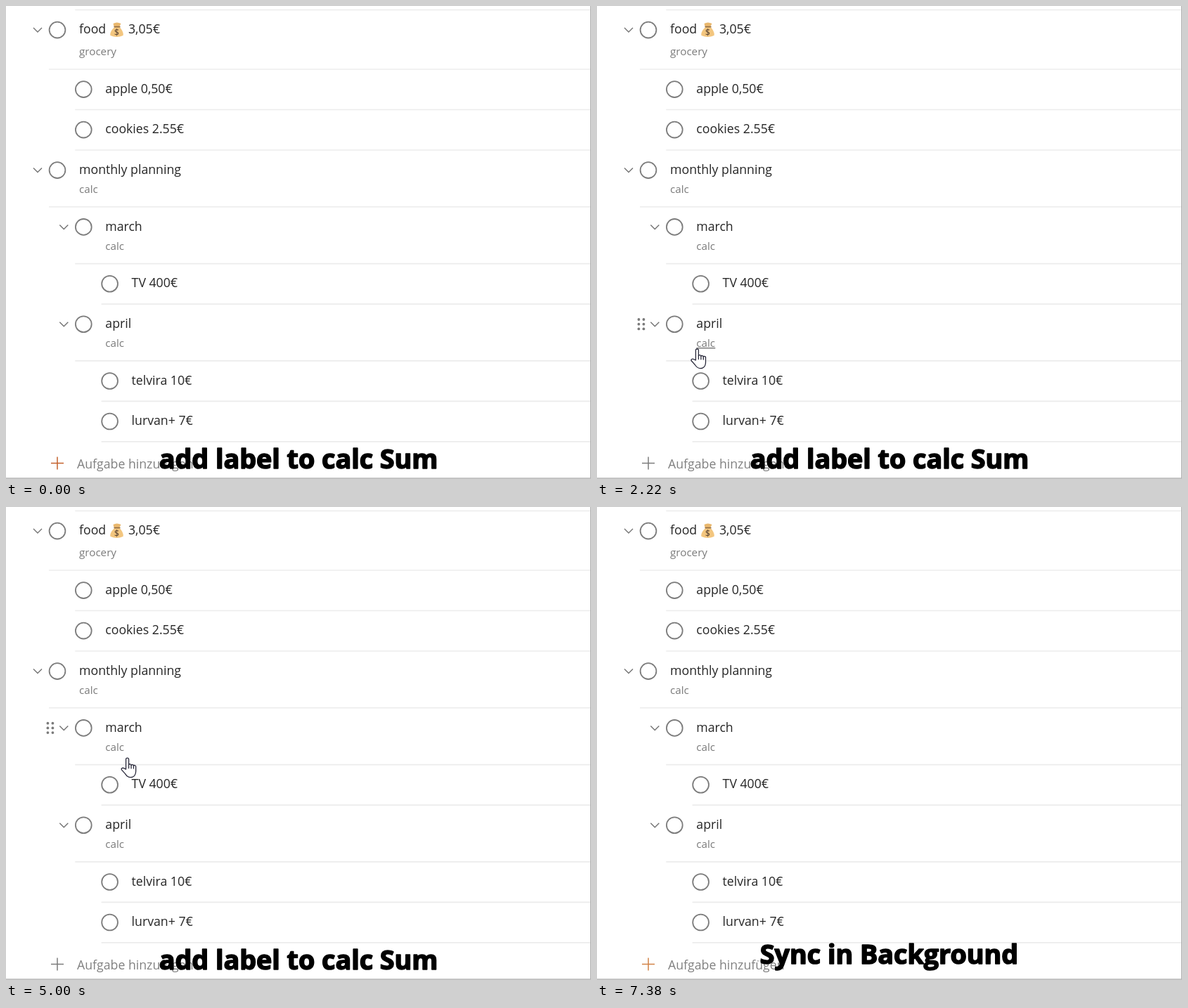
Recreate the animation shown at these times as an HTML page. Size 832 by 673 pixels, loop 8000 ms.

```html
<!DOCTYPE html>
<html lang="en">
<head>
<meta charset="utf-8">
<title>Task list</title>
<style>
  html, body { margin: 0; width: 100%; height: 100%; overflow: hidden; background: #fff; }
  svg { display: block; width: 832px; height: 673px; font-family: "Open Sans", "Noto Sans", sans-serif; }
  .name { font-size: 17.7px; fill: #262626; }
  .label { font-size: 15.2px; fill: #7a7a7a; }
  .rule { stroke: #ececec; stroke-width: 1.6; }
  .ring { fill: none; stroke: #7c7c7c; stroke-width: 1.8; }
  .thin { fill: none; stroke: #747474; stroke-width: 1.4; }
  .caption { font-size: 37.7px; font-weight: 700; text-anchor: middle; stroke: #000; stroke-width: 1.6; stroke-linejoin: round; }
  .hand { fill: #fff; stroke: #29293a; stroke-width: 1.3; stroke-linejoin: round; stroke-linecap: round; }
</style>
</head>
<body>
<svg id="stage" viewBox="0 0 832 673"></svg>
<script>
const LOOP = 8000, INDENT = 37.3, FIRST_TOP = 5.5;
const PLAIN_HEIGHT = 57.5, LABEL_HEIGHT = 80.8, EMOJI_EXTRA = 3.7;
const ORANGE = '#c4622d', GRAY = '#7c7c7c';
const stage = document.getElementById('stage');

function add(tag, attrs = {}, text = '', parent = stage) {
  const node = document.createElementNS('http://www.w3.org/2000/svg', tag);
  for (const key in attrs) node.setAttribute(key, attrs[key]);
  node.textContent = text;
  parent.append(node);
  return node;
}

const show = (node, on) => node.setAttribute('visibility', on ? 'visible' : 'hidden');
const rule = (x, y) => add('line', { class: 'rule', x1: x, x2: 831, y1: y, y2: y });

const tasks = [
  { depth: 0, name: 'food', label: 'grocery', total: '3,05€' },
  { depth: 1, name: 'apple 0,50€' },
  { depth: 1, name: 'cookies 2.55€' },
  { depth: 0, name: 'monthly planning', label: 'calc' },
  { depth: 1, name: 'march', label: 'calc' },
  { depth: 2, name: 'TV 400€', },
  { depth: 1, name: 'april', label: 'calc' },
  { depth: 2, name: 'telvira 10€' },
  { depth: 2, name: 'lurvan+ 7€' }
];

function addBag(x, y) {
  const bag = add('g', { transform: `translate(${x} ${y})` });
  add('path', { fill: '#f3c67f', d: 'M-3-4C-8 0-10 5-9 8Q0 12 9 8C10 5 8 0 4-4Z' }, '', bag);
  add('path', { fill: '#e9b86e', d: 'M-4-5L-5-9Q0-12 6-9L4-5Z' }, '', bag);
  add('path', { stroke: '#8f6b43', 'stroke-width': 1.6, d: 'M-4-4.5h9' }, '', bag);
  add('text', { y: 8, 'font-size': 12, 'font-weight': 600, 'text-anchor': 'middle', fill: '#68503a' }, '$', bag);
}

function addGrip(x, y) {
  const grip = add('g', { fill: '#7a7a7a' });
  for (let i = 0; i < 6; i++)
    add('circle', { cx: x + (i % 2 - .5) * 7, cy: y + ((i >> 1) - 1) * 6.7, r: 1.9 }, '', grip);
  return grip;
}

function addRow(task, top) {
  const { depth, name, label, total } = task;
  const shift = depth * INDENT, cx = 73 + shift, textX = 104 + shift;
  const cy = top + 28.6, extra = total ? EMOJI_EXTRA : 0;
  const bottom = top + (label ? LABEL_HEIGHT : PLAIN_HEIGHT) + extra;
  const row = { top, bottom, grip: addGrip(cx - (label ? 47.4 : 26.3), cy) };

  rule(61 + shift, bottom);
  add('circle', { class: 'ring', cx, cy, r: 11.4 });
  add('text', { class: 'name', x: textX, y: cy + 5.2 }, name);
  if (label) {
    const y = cy + 32.4 + extra;
    add('text', { class: 'label', x: textX, y }, label);
    add('path', { class: 'thin', d: `M${cx - 34} ${cy - 3}l6 6 6-6` });
    row.link = { x: textX, y };
    row.underline = add('path', { class: 'thin', d: `M${textX} ${y + 1.6}h27` });
  }
  if (total) {
    addBag(157.5, cy);
    add('text', { class: 'name', x: 174, y: cy + 5.2 }, total);
  }
  return row;
}

rule(61 + INDENT, FIRST_TOP);
const rows = [];
let listEnd = FIRST_TOP;
for (const task of tasks) {
  rows.push(addRow(task, listEnd));
  listEnd = rows.at(-1).bottom;
}

const disc = add('circle', { cx: 73, cy: 650.5, r: 11.7, fill: ORANGE });
const plus = add('path', { 'stroke-width': 1.5, d: 'M64 650.5h18M73 641.5v18' });
const addText = add('text', { class: 'name', x: 101, y: 657.5 }, 'Aufgabe hinzufügen');
add('path', { stroke: '#aaa', d: 'M831.5 0V672' });
add('path', { stroke: '#b0b0b0', 'stroke-width': 1.5, d: 'M0 672H832' });

const hand = add('g', { class: 'hand' });
add('path', { d: 'M7.4 17V3a2 2 0 0 1 4 0V10.6a1.9 1.9 0 0 1 3.5.6a1.9 1.9 0 0 1 3.4 1a1.8 1.8 0 0 1 3.2 1.5V20C21.5 24 19.5 28.6 14 28.6C9.5 28.6 8 26 6.4 23.5L1.2 17.8C.2 15.8 2.8 14.4 4.4 15.6Z' }, '', hand);
add('path', { fill: 'none', d: 'M11.4 10.6v5m3.5-4.2v4.4m3.4-3.4v3.6' }, '', hand);

const first = add('text', { class: 'caption', x: 416, y: 658 }, 'add label to calc Sum');
const second = add('text', { class: 'caption', x: 415.5, y: 649.5 }, 'Sync in Background');

// The hand rests between moves; each move ends at (x, y).
const entry = { from: 110, x: 646, y: 656 }, HAND_LEAVES = 6550;
const moves = [
  { from: 110, to: 420, x: 378, y: 632 },
  { from: 745, to: 820, x: 359, y: 603 },
  { from: 820, to: 1680, x: 183, y: 487 },
  { from: 1835, to: 2220, x: 133, y: 487 },
  { from: 2300, to: 3220, x: 169, y: 493 },
  { from: 3220, to: 3600, x: 303, y: 528 },
  { from: 3845, to: 4310, x: 146, y: 333 },
  { from: 4385, to: 4540, x: 153, y: 354 },
  { from: 4830, to: 5000, x: 163, y: 356 },
  { from: 5000, to: 5780, x: 293, y: 442 },
  { from: 5780, to: 6170, x: 260, y: 381 },
  { from: 6170, to: 6550, x: 420, y: 680 }
];

function handAt(t) {
  if (t < entry.from || t >= HAND_LEAVES) return null;
  let { x, y } = entry;
  for (const move of moves) {
    const k = Math.min(1, Math.max(0, (t - move.from) / (move.to - move.from)));
    x += (move.x - x) * k;
    y += (move.y - y) * k;
  }
  return { x, y };
}

function draw(t) {
  const pos = handAt(t);
  const tip = pos ? { x: pos.x + 9, y: pos.y + 1 } : { x: -1, y: -1 };
  show(hand, pos);
  if (pos) hand.setAttribute('transform', `translate(${pos.x} ${pos.y})`);

  for (const { top, bottom, grip, link, underline } of rows) {
    show(grip, tip.y >= top && tip.y < bottom);
    if (link) {
      const dx = tip.x - link.x, dy = tip.y - link.y;
      show(underline, dx >= 0 && dx < 27 && dy > -16 && dy < 5);
    }
  }

  const hover = tip.y >= listEnd && tip.y < 672;
  const idle = t < 820 ? ORANGE : t < HAND_LEAVES ? GRAY : '#d18347';
  show(disc, hover);
  plus.setAttribute('stroke', hover ? '#fff' : idle);
  addText.style.fill = hover ? ORANGE : '#808080';
  show(first, t < HAND_LEAVES);
  show(second, t >= 7380);
}

const start = performance.now();
function tick() {
  draw((performance.now() - start) % LOOP);
  requestAnimationFrame(tick);
}
tick();
</script>
</body>
</html>
```
